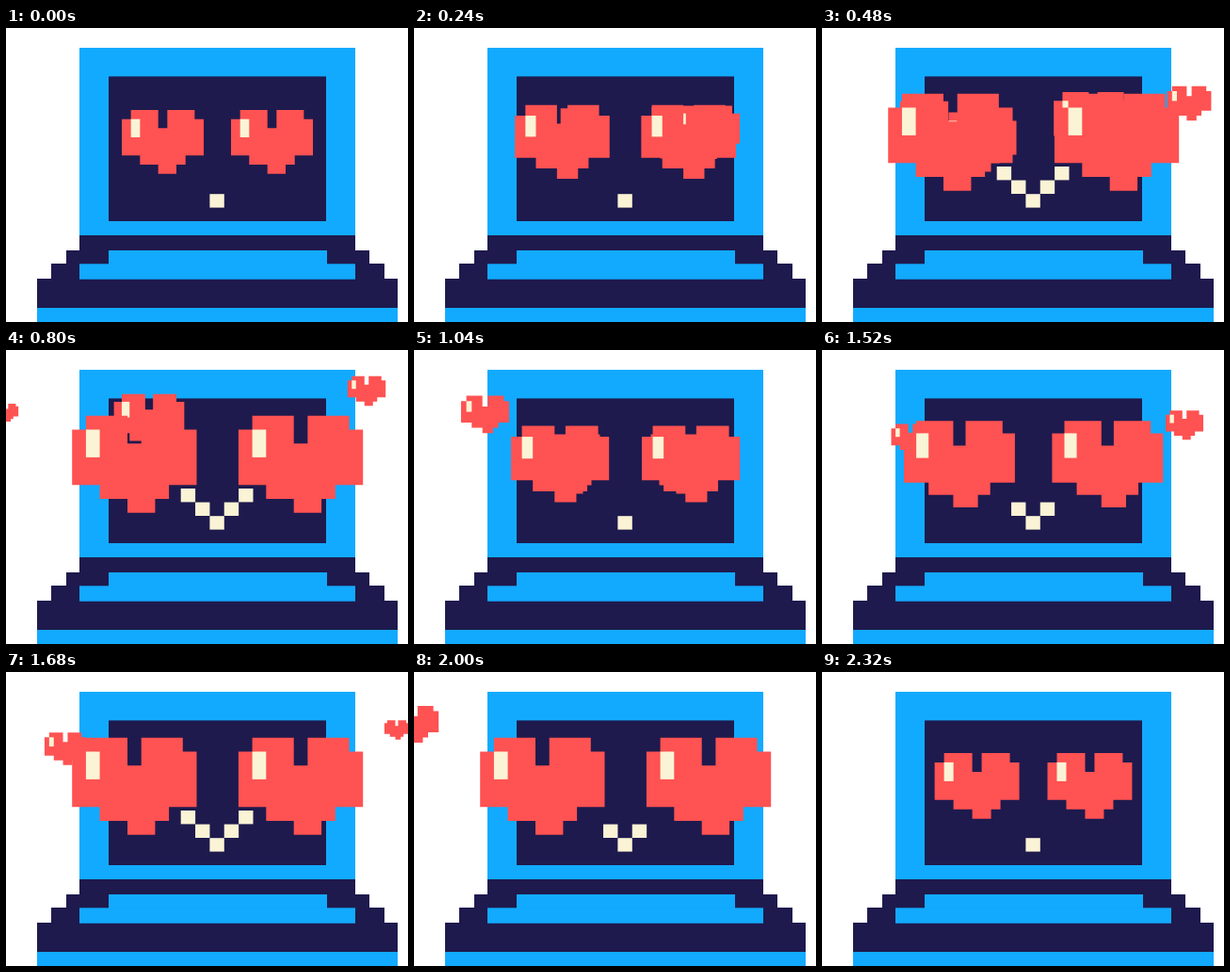
Write an HTML page with a canvas that moves like this. It is 427 by 312 pixels and loops after 2360 ms.

```html
<!DOCTYPE html>
<html lang="en">
<head>
<meta charset="utf-8">
<title>Laptop in love</title>
<style>
  html, body { margin: 0; width: 100%; height: 100%; overflow: hidden; background: #fff; }
  canvas { display: block; width: 427px; height: 312px; }
</style>
</head>
<body>
<canvas id="stage" width="427" height="312"></canvas>
<script>
const ctx = document.getElementById('stage').getContext('2d');
const BLUE = '#12aaff', NAVY = '#1e1a4d', RED = '#ff5252', CREAM = '#fbf3d5';
const LOOP = 2360, BEAT = 1180, STEP = 80, LEG = 320, CENTRE = 224.5;

const HEART = [
  ' ### ### ',
  '#### ####',
  '#########',
  '#########',
  '#########',
  '  #####  ',
  '    ##   '
];

// A small heart leaves its eye and passes two points, one leg of time apart
const EYE = { left: [166, 121, 9], right: [283, 121, 9] };
const FLIGHTS = [
  { launch: 160, path: [EYE.right, [390, 80, 5.2], [480, 72, 2]] },
  { launch: 160, path: [EYE.left, [108.5, 92, 5.7], [1, 66.5, 2.7]] },
  { launch: 160, path: [EYE.right, [288, 100.5, 9.3], [383, 43.5, 4.5]] },
  { launch: 480, path: [EYE.left, [152, 75.7, 8.3], [50, 66, 4.8]] },
  { launch: 1040, path: [EYE.right, [355, 98, 6], [415, 61.5, 2.9]] },
  { launch: 1040, path: [EYE.left, [125, 107.5, 4.2], [63, 81.5, 4.9]] }
];

const mix = (a, b, p) => a + (b - a) * p;
const smooth = (a, b, t) => {
  const p = Math.min(1, Math.max(0, (t - a) / (b - a)));
  return p * p * (3 - 2 * p);
};

function rect(color, x, y, w, h) {
  ctx.fillStyle = color;
  ctx.fillRect(x, y, w, h);
}

function heart(x, y, cell) {
  ctx.beginPath();
  HEART.forEach((row, r) => {
    for (const run of row.matchAll(/#+/g)) {
      ctx.rect(x + run.index * cell, y + r * cell, run[0].length * cell, cell);
    }
  });
  ctx.fillStyle = RED;
  ctx.fill();
  // Hearts far away lose their glint
  if (cell > 4.3) rect(CREAM, x + cell, y + cell, cell, 2 * cell);
}

function band(color, half, top, bottom) {
  const left = Math.round(CENTRE - half), right = Math.round(CENTRE + half);
  rect(color, left, top, right - left, bottom - top);
}

function laptop() {
  band(BLUE, 146.5, 21, 220);
  band(NAVY, 115.5, 51.4, 205);
  band(NAVY, 146.5, 220, 236);
  band(NAVY, 161, 236, 250);
  band(NAVY, 177, 250, 266);
  band(NAVY, 191.5, 266, 297);
  band(BLUE, 116, 236, 251);
  band(BLUE, 146.5, 250.3, 266.7);
  band(BLUE, 191.5, 297, 312);
}

function mouth(phase) {
  const wide = phase > 460 && phase < 810, open = phase > 300 && phase < 980;
  const reach = wide + open;
  for (let i = -reach; i <= reach; i++) {
    rect(CREAM, 216.4 + i * 15.35, 176.2 - Math.abs(i) * 14.6, 15.4, 14.4);
  }
}

function fly({ launch, path }, t) {
  if (t < launch) return;
  const p = (t - launch) / LEG, i = p < 1 ? 0 : 1;
  const [x, y, cell] = path[i].map((v, n) => mix(v, path[i + 1][n], p - i));
  if (cell > 0) heart(x - 4.5 * cell, y - 3.5 * cell, cell);
}

function eyes(phase) {
  const p = smooth(100, 485, phase) * (1 - smooth(820, 1198, phase));
  const y = mix(87, 69.8, p), cell = mix(9.67, 14.7, p);
  heart(mix(123, 70.2, p), y, cell);
  heart(mix(239, 246.9, p), y, cell);
}

function draw(time) {
  // The picture advances in steps, with a longer first hold
  const t = time < 2 * STEP ? 0 : Math.floor(time / STEP) * STEP;
  const phase = t % BEAT;
  rect('#fff', 0, 0, 427, 312);
  laptop();
  mouth(phase);
  FLIGHTS.forEach(flight => fly(flight, t));
  eyes(phase);
}

const start = performance.now();
function tick() {
  draw((performance.now() - start) % LOOP);
  requestAnimationFrame(tick);
}
tick();
</script>
</body>
</html>
```
